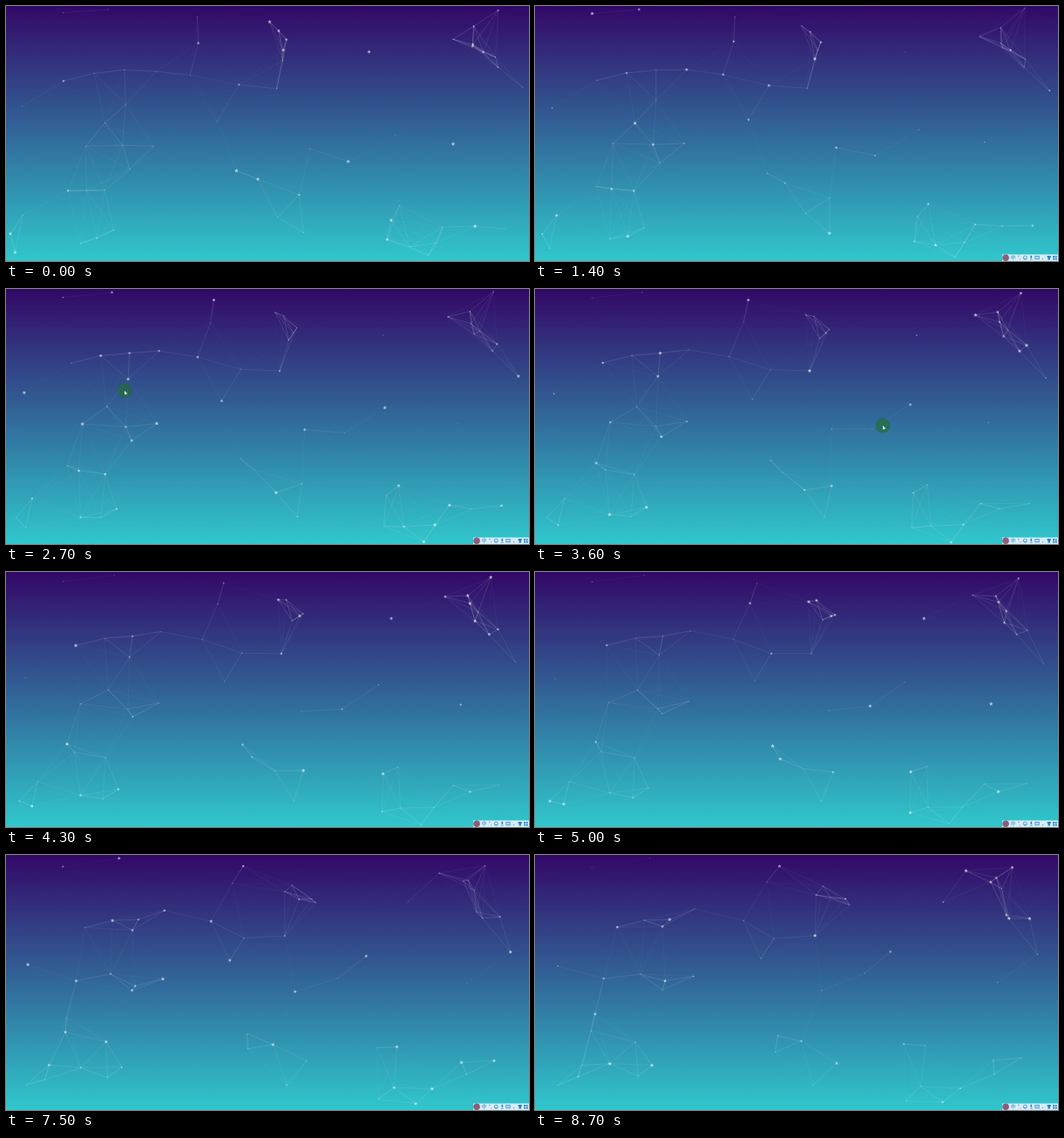
An HTML page with a canvas for the animation above (8.8 s loop, 600 by 293 pixels).

```html
<!DOCTYPE html>
<html lang="en">
<head>
<meta charset="utf-8">
<title>Drifting constellation</title>
<style>
html, body { margin: 0; width: 100%; height: 100%; overflow: hidden; background: #330867; }
canvas { display: block; width: 100vw; height: 100vh; }
</style>
</head>
<body>
<canvas id="stage"></canvas>
<script>
const W = 600, H = 293, LOOP = 8800, STEP = 100;
const REACH = 74, PAD = 1.5, TWINKLE = 5000;
const SCATTER = 2, WANDER = 26;

// A chain bends through a few points; every star in it shares the drift (px per loop).
// Dense chains also carry a star halfway between neighbouring points.
const chains = [
  { bends: [[66, 86], [136, 72], [211, 81]], drift: [23, -8], dense: true },
  { bends: [[136, 112], [93, 160], [171, 163], [115, 212], [70, 213]], drift: [-5, -22], dense: true },
  { bends: [[222, 44], [220, 13]], drift: [39, -18] },
  { bends: [[66, 6], [117, 6], [20, 117]], drift: [-5, 10] },
  { bends: [[304, 18], [321, 38], [318, 62]], drift: [14, 8], dense: true },
  { bends: [[310, 95], [268, 92], [241, 131], [263, 189], [289, 199], [338, 215]], drift: [4, 12] },
  { bends: [[445, 146], [393, 179], [349, 165], [342, 260], [312, 244]], drift: [-16, -20] },
  { bends: [[564, 7], [512, 37], [561, 58], [535, 46], [594, 92]], drift: [2, 1], dense: true },
  { bends: [[450, 227], [437, 268], [486, 287], [502, 254], [575, 255]], drift: [2, -8], dense: true },
  { bends: [[18, 240], [4, 260], [12, 283]], drift: [30, -8] },
  { bends: [[122, 259], [86, 272]], drift: [-10, -10], dense: true },
  { bends: [[418, 53], [512, 160]], drift: [39, 5] }
];

function seeded(seed) {
  return () => {
    seed = seed + 0x6d2b79f5 | 0;
    let n = Math.imul(seed ^ seed >>> 15, 1 | seed);
    n = n + Math.imul(n ^ n >>> 7, 61 | n) ^ n;
    return ((n ^ n >>> 14) >>> 0) / 2 ** 32;
  };
}

const random = seeded(11);
const around = (v, spread) => v + (random() * 2 - 1) * spread;
const mix = (a, b, k) => a + (b - a) * k;

function makeStars({ bends, drift, dense }) {
  const stars = [];
  for (let u = 0; u <= bends.length - 1; u += dense ? .5 : 1) {
    const a = bends[Math.floor(u)], b = bends[Math.ceil(u)];
    stars.push({
      x: around(mix(a[0], b[0], u % 1), SCATTER),
      y: around(mix(a[1], b[1], u % 1), SCATTER),
      dx: around(drift[0], WANDER),
      dy: around(drift[1], WANDER),
      peak: random() * TWINKLE
    });
  }
  return stars;
}

const stars = chains.flatMap(makeStars);

const canvas = document.getElementById("stage");
const ctx = canvas.getContext("2d");
const sky = ctx.createLinearGradient(0, 0, 0, H * 1.04);
sky.addColorStop(0, "#330867");
sky.addColorStop(1, "#30cfd0");

function resize() {
  const dpr = devicePixelRatio || 1;
  canvas.width = Math.round(innerWidth * dpr);
  canvas.height = Math.round(innerHeight * dpr);
}

function bounce(v, size) {
  if (v < PAD) return 2 * PAD - v;
  if (v > size - PAD) return 2 * (size - PAD) - v;
  return v;
}

function place(star, t) {
  const k = t / LOOP;
  return {
    x: bounce(star.x + star.dx * k, W),
    y: bounce(star.y + star.dy * k, H),
    glow: (.5 + .5 * Math.cos((t - star.peak) / TWINKLE * 2 * Math.PI)) ** 2
  };
}

function drawLinks(points) {
  ctx.lineWidth = .5;
  points.forEach((a, i) => {
    for (const b of points.slice(i + 1)) {
      const d = Math.hypot(a.x - b.x, a.y - b.y);
      if (d >= REACH) continue;
      ctx.strokeStyle = `rgba(255,255,255,${.4 * (1 - d / REACH)})`;
      ctx.beginPath();
      ctx.moveTo(a.x, a.y);
      ctx.lineTo(b.x, b.y);
      ctx.stroke();
    }
  });
}

function drawStar({ x, y, glow }) {
  const r = .7 + 1.6 * glow;
  ctx.fillStyle = `rgba(255,255,255,${.36 + .26 * glow})`;
  ctx.beginPath();
  for (let i = 0; i < 10; i++) {
    const a = i * Math.PI / 5 - Math.PI / 2;
    const q = i % 2 ? r * .5 : r;
    ctx.lineTo(x + q * Math.cos(a), y + q * Math.sin(a));
  }
  ctx.fill();
}

function disc(x, y, r, color) {
  ctx.fillStyle = color;
  ctx.beginPath();
  ctx.arc(x, y, r, 0, 2 * Math.PI);
  ctx.fill();
}

function drawPointer(t) {
  if (t < 2500 || t > 3900) return;
  const k = Math.min(1, Math.max(0, (t - 2700) / 900));
  const x = mix(136, 399, k), y = mix(117, 157, k);
  disc(x, y, 8.5, "rgba(32,112,42,.6)");
  ctx.fillStyle = "#fff";
  ctx.beginPath();
  ctx.moveTo(x, y);
  ctx.lineTo(x, y + 4.6);
  ctx.lineTo(x + 3.3, y + 3.2);
  ctx.fill();
}

function drawInputBar() {
  const blue = "#1684c9", y = 289.2;
  ctx.fillStyle = "#d9edf8";
  ctx.fillRect(536, 285.5, 64, 7.5);
  disc(540, y, 3.8, "#86607a");
  ctx.fillStyle = ctx.strokeStyle = blue;
  ctx.lineWidth = .7;
  ctx.textAlign = "center";
  ctx.textBaseline = "middle";
  ctx.font = '5.5px "Noto Sans CJK SC", "Noto Sans CJK", sans-serif';
  ctx.fillText("中", 548.5, y);
  ctx.fillText("°,", 555.5, y);
  // Smiley
  ctx.beginPath();
  ctx.arc(562.3, y, 2.1, 0, 2 * Math.PI);
  ctx.moveTo(563.3, y + .4);
  ctx.arc(562.3, y + .4, 1, 0, Math.PI);
  ctx.stroke();
  // Microphone
  ctx.fillRect(568.5, y - 2.4, 1.6, 3);
  ctx.fillRect(568, y + 1.6, 2.7, .7);
  // Keyboard and dot
  ctx.strokeRect(573.8, y - 1.7, 4.4, 3.4);
  ctx.fillRect(574.8, y - .4, 2.4, .6);
  ctx.fillRect(582, y + 1, 1, 1);
  // Shirt
  ctx.fillRect(587.5, y - 2, 4.4, 1.6);
  ctx.fillRect(588.5, y - 2, 2.4, 4.4);
  // Toolbox
  for (let i = 0; i < 3; i++) ctx.fillRect(594.2 + 2.6 * (i >> 1), y - 2.2 + 2.6 * (i > 0), 2, 2);
  disc(597.8, y - 1.2, 1, blue);
}

function draw(t) {
  ctx.setTransform(canvas.width / W, 0, 0, canvas.height / H, 0, 0);
  ctx.fillStyle = sky;
  ctx.fillRect(0, 0, W, H);
  const points = stars.map(star => place(star, t));
  drawLinks(points);
  points.forEach(drawStar);
  if (t >= 500) drawInputBar();
  drawPointer(t);
}

const start = performance.now();
function tick() {
  const t = (performance.now() - start) % LOOP;
  draw(Math.floor(t / STEP) * STEP);
  requestAnimationFrame(tick);
}
addEventListener("resize", resize);
resize();
tick();
</script>
</body>
</html>
```
